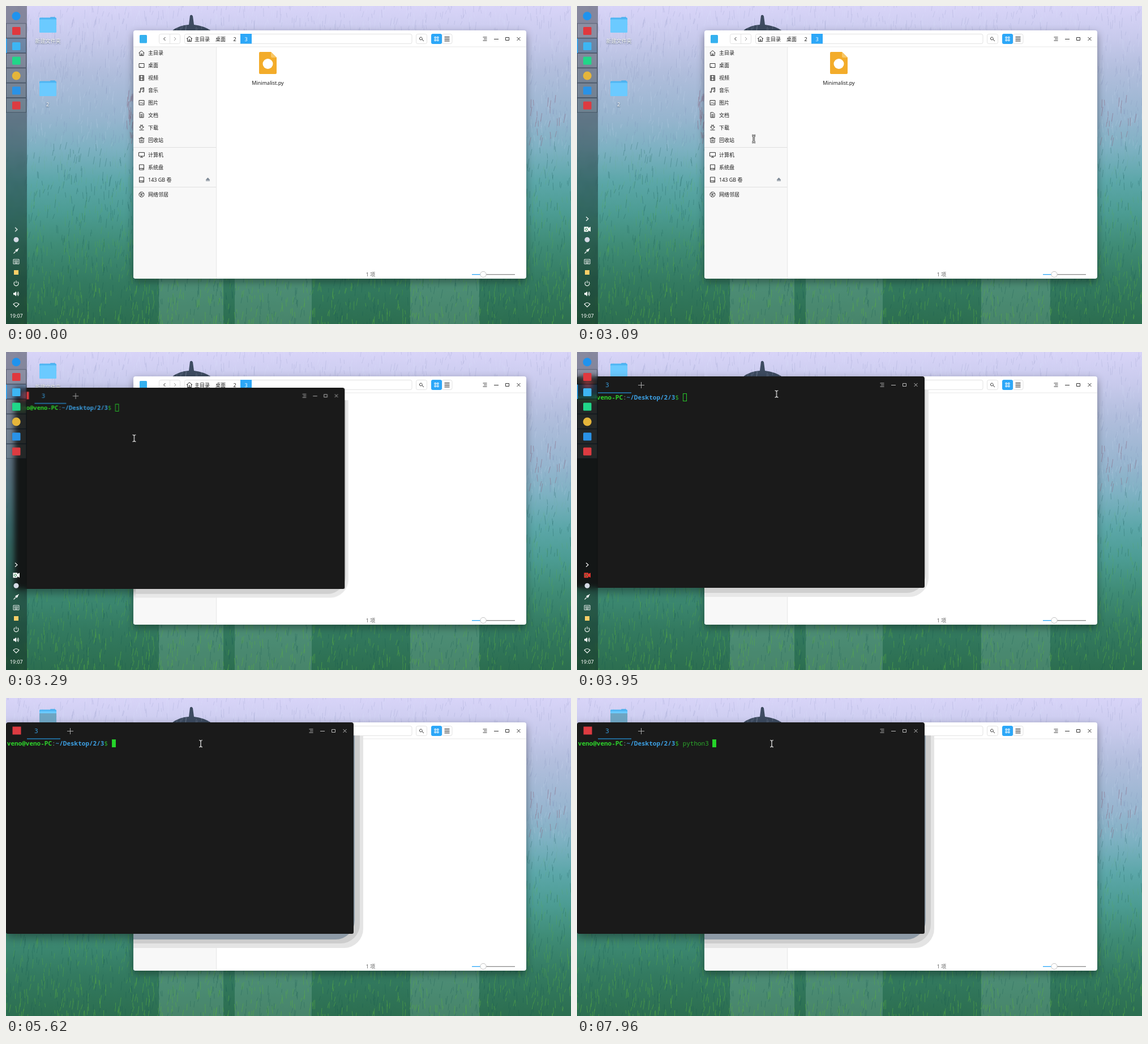
An HTML page with a canvas that plays this animation: 998 px wide and 561 px high, repeating every 8000 ms.

```html
<!DOCTYPE html>
<html lang="zh-CN">
<head>
<meta charset="utf-8">
<title>Desktop</title>
<style>
html, body { margin: 0; width: 998px; height: 561px; overflow: hidden; background: #3d8a74; }
#stage { position: relative; width: 998px; height: 561px; overflow: hidden; }
#stage > *, .term > *, .rings > * { position: absolute; }
canvas, #desk, #menu { left: 0; top: 0; }
svg { display: block; overflow: visible; }
text { font: 500 9px "Noto Sans", "Noto Sans CJK SC", "Noto Sans CJK", sans-serif; fill: #1c1c1c; }
.line { fill: none; stroke: #333; stroke-width: 1; }
.anim, #menu, #hover, .term, .typed, .caret, .late, .dock, .tray, .arrow, .red, #mouse {
  animation: 8s linear infinite;
}

#menu { animation-name: menu; }
@keyframes menu { 0%, 10.125% { opacity: 0 } 13%, 30.875% { opacity: 1 } 34%, 100% { opacity: 0 } }
#hover { animation-name: hover; animation-timing-function: step-end; }
@keyframes hover { 0% { opacity: 0 } 22.3% { opacity: 1 } 100% { opacity: 1 } }

.term { left: 0; top: 43px; width: 613.5px; height: 373px; transform-origin: 0 0; animation-name: open; }
@keyframes open {
  0%, 38.9% { opacity: 0; transform: translate(61px, 78px) scale(.8) }
  39.3% { opacity: .6; transform: translate(48px, 62px) scale(.84) }
  39.875% { opacity: 1; transform: translate(31px, 40.5px) scale(.897, .903); animation-timing-function: ease-out }
  43.5%, 100% { opacity: 1; transform: none }
}
.shade { left: -20px; top: -43px; width: 245px; height: 470px; overflow: hidden; }
.shade i { position: absolute; left: 20px; top: 43px; width: 613px; height: 373px; box-shadow: 0 7px 16px rgba(0,0,0,.4); }
.rings { left: 225px; top: 23px; width: 410px; height: 380px; overflow: hidden; }
.rings i { left: 0; top: 0; border-bottom-right-radius: 34px; }
.late { animation-name: late; animation-timing-function: step-end; }
@keyframes late { 0% { opacity: 0 } 54.4% { opacity: 1 } 100% { opacity: 1 } }
.body { inset: 0; background: #1a1a1a; border-radius: 4px 4px 3px 3px; overflow: hidden; }
.cmd {
  position: absolute; left: 1.8px; top: 29px; height: 15px; display: flex; white-space: pre;
  font: 11px/15px "Noto Sans Mono", "DejaVu Sans Mono", monospace; color: #2ba82b;
}
.cmd b { color: #2ed52b; }
.cmd b + s + b { color: #3c9fe2; }
.cmd s { text-decoration: none; color: #8a9a8a; }
.typed { overflow: hidden; animation-name: type; animation-timing-function: step-end; }
@keyframes type {
  0% { width: 0 } 74.375% { width: 1ch } 78% { width: 2ch } 81.125% { width: 3ch }
  82.125% { width: 4ch } 85.25% { width: 5ch } 87.25% { width: 6ch }
  96.5% { width: 7ch } 99.5% { width: 8ch } 100% { width: 8ch }
}
.caret {
  box-sizing: border-box; width: 7px; height: 14px; margin-top: 1px; border: 1px solid #27c92a;
  animation-name: caret; animation-timing-function: step-end;
}
@keyframes caret {
  0% { background: transparent; opacity: 1 } 54.4% { background: #24d529; opacity: 1 }
  59.375% { background: #24d529; opacity: 0 } 66.75% { background: #24d529; opacity: 1 }
  94.5% { background: #24d529; opacity: 0 } 96.5%, 100% { background: #24d529; opacity: 1 }
}

.dock {
  left: 0; top: 0; width: 36.5px; height: 561px; background: rgba(10,16,16,.38);
  backdrop-filter: blur(5px); animation-name: hide;
}
@keyframes hide {
  0%, 52.6% { transform: none } 56.25%, 100% { transform: translateX(-40px) }
}
.tray { animation-name: tray; animation-timing-function: step-end; }
@keyframes tray { 0% { opacity: 0 } 2.3% { opacity: 1 } 100% { opacity: 1 } }
.arrow { animation-name: arrow; animation-timing-function: step-end; }
@keyframes arrow { 0% { transform: translateY(18.7px) } 1.75% { transform: none } 100% { transform: none } }
.red { animation-name: blink; animation-timing-function: step-end; }
@keyframes blink {
  0% { fill: #fff } 2.3% { fill: #e8352f } 12% { fill: #fff } 21.75% { fill: #e8352f }
  31% { fill: #fff } 48.75% { fill: #e8352f } 100% { fill: #e8352f }
}

#mouse { left: 0; top: 0; animation-name: mouse; }
@keyframes mouse {
  0%, 37.99% { opacity: 0; transform: translate(355px, 262px) }
  38% { opacity: 1; transform: translate(355px, 262px) }
  38.625% { transform: translate(313px, 235px) }
  39.875% { transform: translate(230.5px, 180px) }
  42.5% { transform: translate(222px, 122px) }
  46% { transform: translate(335px, 79px) }
  48% { transform: translate(353px, 73px) }
  49.375%, 63% { transform: translate(352.5px, 74px) }
  63.5%, 66.75% { transform: translate(348px, 76px) }
  70.25%, 100% { opacity: 1; transform: translate(344px, 80.5px) }
}
</style>
</head>
<body>
<div id="stage">
  <canvas width="998" height="561"></canvas>
  <svg id="desk" width="998" height="561"></svg>
  <svg id="menu" width="998" height="561"></svg>
  <div class="term">
    <div class="shade"><i></i></div>
    <div class="rings">
      <i style="width:396px;height:366px;background:#e8e8e8"></i>
      <i style="width:391px;height:359px;background:#d0d0d0"></i>
      <div class="late">
        <i style="position:absolute;width:406px;height:375px;background:#e4e4e4"></i>
        <i style="position:absolute;width:400px;height:367px;background:#cdcdcd"></i>
        <i style="position:absolute;width:391px;height:360px;background:#8d9aa6"></i>
      </div>
    </div>
    <div class="body">
      <svg id="bar" width="613" height="30" style="position:absolute"></svg>
      <div class="cmd"><b>veno@veno-PC</b><s>:</s><b>~/Desktop/2/3</b><span>$ </span><span class="typed">python3 </span><span class="caret"></span></div>
    </div>
  </div>
  <div class="late" style="left:59px;top:27px;width:30px;height:16px;background:rgba(112,150,170,.7)"></div>
  <div class="dock"><svg id="dock" width="37" height="561"></svg></div>
  <svg id="mouse" width="1" height="1">
    <g fill="none">
      <path d="M-3-6Q0-6 0-4Q0-6 3-6M0-5V5M-3 6Q0 6 0 4Q0 6 3 6" stroke="#111" stroke-width="3"/>
      <path d="M-3-6Q0-6 0-4Q0-6 3-6M0-5V5M-3 6Q0 6 0 4Q0 6 3 6" stroke="#fff" stroke-width="1.2"/>
    </g>
  </svg>
</div>
<script>
const $ = id => document.getElementById(id);
const text = (x, y, s, more = '') => `<text x="${x}" y="${y + 3.3}" ${more}>${s}</text>`;
const mid = 'text-anchor="middle"';
const rect = (x, y, w, h, more = '') => `<rect x="${x}" y="${y}" width="${w}" height="${h}" ${more}/>`;
const path = (d, more = 'class="line"') => `<path d="${d}" ${more}/>`;
const disc = (x, y, r, fill) => `<circle cx="${x}" cy="${y}" r="${r}" fill="${fill}"/>`;
const at = (x, y, s) => `<g transform="translate(${x} ${y})">${s}</g>`;
const BLUE = '#2ca7f8';

function paintWallpaper() {
  const c = document.querySelector('canvas').getContext('2d');
  let seed = 7;
  const rnd = () => (seed = (seed * 16807) % 2147483647) / 2147483647;
  const sky = c.createLinearGradient(0, 0, 0, 561);
  [[0, '#d8d4f8'], [.1, '#c8caec'], [.2, '#b2bedd'], [.35, '#97b5cf'], [.45, '#7db1c2'], [.55, '#5ca7a9'],
   [.65, '#4c9c93'], [.75, '#3f8c76'], [.87, '#337a60'], [1, '#2c6e50']].forEach(s => sky.addColorStop(...s));
  c.fillStyle = sky;
  c.fillRect(0, 0, 998, 561);

  // umbrella behind the window
  c.fillStyle = '#3d4b60';
  c.beginPath();
  c.moveTo(293, 44);
  c.quadraticCurveTo(305, 34, 323, 33);
  c.lineTo(325, 17);
  c.quadraticCurveTo(328, 14, 330, 18);
  c.lineTo(332, 33);
  c.quadraticCurveTo(350, 35, 363, 44);
  c.fill();

  // paler columns under the window
  c.fillStyle = 'rgba(150,200,185,.25)';
  [[270, 114], [404, 136], [714, 122]].forEach(([x, w]) => c.fillRect(x, 470, w, 91));

  const streak = (x, y, len, color, width = 1) => {
    c.strokeStyle = color;
    c.lineWidth = width;
    c.beginPath();
    c.moveTo(x, y);
    c.lineTo(x + (rnd() - .35) * 5, y - len);
    c.stroke();
  };
  for (let i = 0; i < 5200; i++) {
    const x = rnd() * 998, y = rnd() * 575, k = y / 561, len = 6 + rnd() * 11;
    if (k < .45) streak(x, y, len, rnd() < .5 ? 'rgba(105,120,165,.16)' : 'rgba(225,232,250,.16)');
    else if (rnd() < .45) streak(x, y, len, 'rgba(20,85,80,.28)');
    else streak(x, y, len, `rgba(90,175,65,${(k - .42) * .95})`);
  }
  for (let i = 0; i < 44; i++) {
    const right = i % 2;
    streak(right ? 921 + rnd() * 68 : 214 + rnd() * 10, 165 + rnd() * 85, 8 + rnd() * 9, 'rgba(140,100,125,.5)');
  }
}

const folder = (x, y) => at(x, y,
  rect(19, 0, 9, 5, 'rx="1" fill="#3fa9ea"') + rect(0, 1, 30, 26, 'rx="1.5" fill="#4fb5f2"') +
  rect(0, 4, 30, 23.5, 'rx="1.5" fill="#6bcaff"'));

// 10 x 10 outline icons
const icons = {
  home: 'M0 5L5 .5 10 5M1.5 4V9.5H8.5V4M4 9.5V6.5H6V9.5',
  desk: 'M.5 1.5H9.5V8.5H.5ZM2.5 8.5V6.5',
  film: 'M1 .5H9V9.5H1ZM3 .5V9.5M7 .5V9.5M3 5H7M1 3.5H3M1 6.5H3M7 3.5H9M7 6.5H9',
  note: 'M3 8V1.5L9 .5V7M3 3.5L9 2.5M3 8A1.2 1.2 0 1 1 2.9 7.6M9 7A1.2 1.2 0 1 1 8.9 6.6',
  pic: 'M.5 1H9.5V9H.5ZM1.5 7L4 4.5 6 6.5 7.5 5.5 9 7M7 3H7.5',
  doc: 'M1.5 .5H6L8.5 3V9.5H1.5ZM3 4H7M3 6H7M3 8H7',
  down: 'M3.5 0V4H1L5 8 9 4H6.5V0M1 9.5H9M3.5 1.5H6.5',
  bin: 'M0 2H10M3.5 2V.5H6.5V2M1.5 2V9.5H8.5V2M4 4V8M6 4V8',
  pc: 'M0 1H10V7.5H0ZM5 7.5V9.5M2.5 9.5H7.5',
  disk: 'M1 .5H9V9.5H1ZM1 7H9M6.5 8.3H7.5',
  net: 'M5 .5A4.5 4.5 0 1 1 4.9 .5M1 3L8 8M3 9L5 4 9 3M5 4L3 1'
};
const places = [['home', '主目录', 83], ['desk', '桌面', 105], ['film', '视频', 127], ['note', '音乐', 148.5],
  ['pic', '图片', 170.5], ['doc', '文档', 192.3], ['down', '下载', 214.3], ['bin', '回收站', 236.4],
  ['pc', '计算机', 262.4], ['disk', '系统盘', 284.5], ['disk', '143 GB 卷', 306.5], ['net', '网络邻居', 332.5]];

const winButtons = (x, y, color) => at(x, y, path(
  'M-3.5-3H3.5M-2 0H3.5M-3.5 3H3.5M16 .5H24M36.5-2.5H42.5V2.5H36.5ZM56.5-3L62.5 3M62.5-3L56.5 3',
  `fill="none" stroke="${color}"`));

function drawDesk() {
  const white = 'fill="#fff" style="fill:#fff;text-shadow:0 1px 2px #456"';
  const box = 'rx="3" fill="#fff" stroke="#e2e2e2"';
  let s = folder(59, 19.5) + text(74, 61.5, '新建文件夹', mid + white)
    + folder(59, 131.5) + text(73.5, 173.5, '2', mid + white);
  s += rect(225, 43, 694, 438, 'rx="4" fill="#fff" style="filter:drop-shadow(0 5px 7px rgba(0,0,0,.38))"')
    + rect(225, 72, 146, 408.5, 'rx="3" fill="#f8f8f8"') + rect(225, 71.5, 694, 1, 'fill="#e8e8e8"')
    + rect(371, 72, 1, 409, 'fill="#e6e6e6"');
  // toolbar
  s += rect(236, 51, 13, 14.5, 'rx="1.5" fill="#35b1ef"')
    + rect(270.5, 49.5, 37, 17, box) + path('M289.5 49.5V66.5', 'stroke="#e2e2e2"')
    + path('M281.5 55L278.5 58 281.5 61') + path('M297 55L300 58 297 61', 'fill="none" stroke="#999"')
    + rect(315.5, 49.5, 401.5, 17, box) + at(319, 53, path(icons.home))
    + text(333, 58.3, '主目录') + text(370, 58.3, '桌面') + text(404, 58.3, '2', mid)
    + rect(414, 49, 20, 17.5, `fill="${BLUE}"`) + text(424, 58.3, '3', mid + ' style="fill:#fff"')
    + rect(724.5, 49.5, 19, 17, box) + path('M735.2 57A2.4 2.4 0 1 1 735.1 56.6M734.6 58.8L738 62')
    + rect(770, 49.5, 18, 17, box) + rect(751, 49, 19, 18, `rx="3" fill="${BLUE}"`)
    + path('M757 54.5H759.5V57H757ZM761.5 54.5H764V57H761.5ZM757 59H759.5V61.5H757ZM761.5 59H764V61.5H761.5Z', 'fill="none" stroke="#fff"')
    + path('M774.5 54.5H783.5M774.5 57H783.5M774.5 59.5H783.5M774.5 62H783.5')
    + winButtons(846, 58, '#333');
  // sidebar
  places.forEach(([icon, name, y]) => s += at(234.5, y - 5, path(icons[icon])) + text(251, y, name));
  s += rect(225, 249, 146, 1, 'fill="#e0e0e0"') + rect(225, 319, 146, 1, 'fill="#e0e0e0"')
    + path('M353 307L356.5 303 360 307ZM353 308.5H360', 'fill="#7b8794" stroke="#7b8794" stroke-width=".8"');
  // file and status line
  s += path('M449 81H468L478 91V118Q478 120 476 120H449Q447 120 447 118V83Q447 81 449 81', 'fill="#f3ac2a"')
    + path('M468 81L478 91H470Q468 91 468 89Z', 'fill="#f8c767"') + disc(462.5, 102, 9, '#fff')
    + text(462.5, 135.7, 'Minimalist.py', mid) + text(644, 473.8, '1 项', mid + ' style="fill:#666;font-weight:400"')
    + rect(843, 473, 56, 1.3, 'fill="#8c8c8c"') + rect(823, 473, 20, 1.3, `fill="${BLUE}"`)
    + '<circle cx="843" cy="473.5" r="5.2" fill="#fff" stroke="#c4c4c4"/>';
  $('desk').innerHTML = s;
}

function drawMenu() {
  const items = [['新建文件夹', 202], ['新建文档', 220, 1], ['显示方式', 242, 1], ['排序方式', 260, 1],
    ['以管理员身份打开', 278.7], ['在终端中打开', 296.8], ['粘贴', 318.7], ['全选', 337], ['属性', 358.8]];
  let s = rect(538.5, 189, 111, 181.5, 'rx="4" fill="#fff" stroke="#d4d4d4" stroke-width=".6" style="filter:drop-shadow(0 2px 3px rgba(0,0,0,.3))"');
  [230.5, 307.5, 347.5].forEach(y => s += rect(542, y, 104, 1, 'fill="#e4e4e4"'));
  items.forEach(([name, y, sub]) => s += text(558, y, name) + (sub ? path(`M641 ${y - 3.5}L644 ${y - .5} 641 ${y + 2.5}`) : ''));
  s += `<g id="hover">${rect(538.3, 287.5, 111.4, 18, `fill="${BLUE}"`)}${text(558, 296.8, '在终端中打开', 'style="fill:#fff"')}</g>`;
  $('menu').innerHTML = s;
}

function drawBar() {
  $('bar').innerHTML = rect(11.5, 7.5, 15, 14, 'fill="#dd3b41"')
    + text(53.5, 16, '3', mid + ' style="fill:#3a9fe0;font-size:11px"')
    + rect(37, 28.3, 59, 1.4, 'fill="#2488c8"')
    + path('M108 15.5H119M113.5 10V21', 'stroke="#aaa"') + winButtons(539, 15, '#bbb');
}

function drawDock() {
  let s = '';
  for (let i = 1; i < 7; i++) {
    const y = 4.6 + i * 26.3;
    s += rect(.5, y, 35, 25.3, `fill="${i == 2 ? 'rgba(60,150,220,.2)' : 'rgba(255,255,255,.07)'}" stroke="rgba(15,25,40,.45)" stroke-width=".8"`);
  }
  s += rect(0, 57.5, 1.5, 25.5, `fill="${BLUE}"`);
  const tile = (y, color) => rect(11, y - 7, 14.5, 14, `rx="1.5" fill="${color}"`);
  s += disc(18, 17.8, 7.5, '#1f93ee') + tile(44, '#e0383e') + tile(71, '#3db6f3') + tile(96.5, '#21d789')
    + disc(18.2, 123, 7.5, '#e5b53a') + tile(149.3, '#2a92e6') + tile(175.6, '#dd3b41');
  const ink = 'fill="none" stroke="#fff" stroke-width="1.1"';
  s += path('M16 372L20 375.5 16 379', ink + ' class="arrow"')
    + `<g class="tray"><path class="red" d="M12.5 389.5H20V391.5L24 389.5V398L20 396V398.3H12.5Z"/>${'<circle cx="16.5" cy="394" r="2" fill="none" stroke="#274" stroke-width="1"/>'}</g>`
    + disc(18, 412.3, 4.5, '#d5dae6')
    + path('M13.5 436.5L17 433M19 431L22.5 427.5', ink) + path('M16 431L19 434L21.5 430.5 19.5 428.5Z', 'fill="#fff"')
    + path('M13 447H23V455H13ZM14.5 449.5H21.5M14.5 451.5H21.5M15.5 453.5H20.5', 'fill="none" stroke="#fff" stroke-width=".9" stroke-dasharray="none"')
    + rect(14, 466, 8, 8, 'fill="#fbcf68"')
    + path('M15.5 486.5A4 4 0 1 0 20.5 486.5M18 484.5V489', ink)
    + path('M13 506H15L18 503.5V512L15 509.5H13Z', 'fill="#fff"') + path('M19.5 505.5Q21 507.7 19.5 510M21 504Q23.5 507.7 21 511.5', ink)
    + path('M13 526Q18 521 23 526L18 531Z', ink)
    + text(18.2, 547, '19:07', mid + ' style="fill:#fff"');
  $('dock').innerHTML = s;
}

paintWallpaper();
drawDesk();
drawMenu();
drawBar();
drawDock();
</script>
</body>
</html>
```
